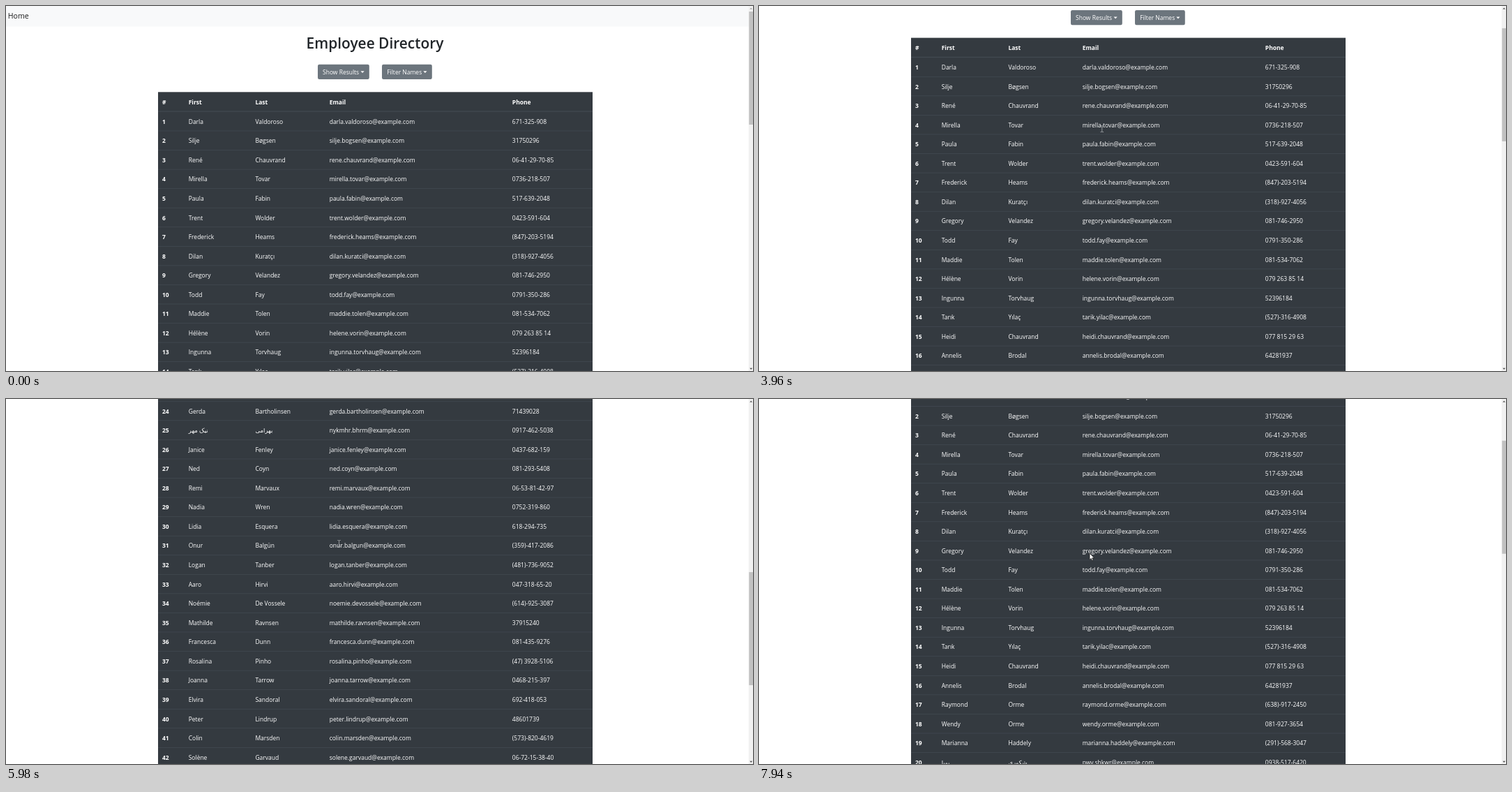
Recreate the animation shown at these times as an HTML page. Size 1071 by 523 pixels, loop 8000 ms.

```html
<!DOCTYPE html>
<html lang="en">
<head>
<meta charset="utf-8">
<title>Employee Directory</title>
<style>
html, body { margin: 0; width: 100%; height: 100%; overflow: hidden; background: #fff; }
svg { display: block; width: 1071px; height: 523px; font: 8.5px "Open Sans", "Noto Sans", "DejaVu Sans", sans-serif; }
.bold { font-weight: 700; }
.light { fill: #fff; }
</style>
</head>
<body>
<svg id="stage" viewBox="0 0 1071 523">
  <g id="page">
    <rect width="1065" height="29.5" fill="#f8f9fa"/>
    <text x="2.8" y="18.4" font-size="10.6" fill="#1a1a1a">Home</text>
    <text x="529" y="61" font-size="20.9" font-weight="600" text-anchor="middle" fill="#212529">Employee Directory</text>
    <g fill="#6c757d">
      <rect x="447" y="83.8" width="73.8" height="21.2" rx="2.2"/>
      <rect x="539" y="83.8" width="71.8" height="21.2" rx="2.2"/>
    </g>
    <g class="light">
      <text x="454" y="97.8">Show Results</text>
      <path d="M508.5 93.2h5.2l-2.6 2.7z"/>
      <text x="546.2" y="97.8">Filter Names</text>
      <path d="M598.3 93.2h5.2l-2.6 2.7z"/>
    </g>
    <g id="table"></g>
  </g>
  <rect x="1064.7" width="6.3" height="523" fill="#f1f1f1"/>
  <rect id="thumb" x="1065.3" width="5.7" height="162" fill="#c1c1c1"/>
  <path id="up" d="M1066.2 4.6h4l-2-2.2z"/>
  <path d="M1066.2 518.8h4l-2 2.2z" fill="#505050"/>
  <g id="cursor">
    <path id="arrow" d="M0 0V9.4l2.2-2 1.5 3.4 1.5-.7-1.5-3.3h2.9z" fill="#fff" stroke="#111" stroke-width=".7"/>
    <path id="beam" d="M-2.2-4.5h1.6l.6.5.6-.5h1.6M0-4V4M-2.2 4.5h1.6l.6-.5.6.5h1.6" fill="none" stroke="#b4b7ba" stroke-width=".75"/>
  </g>
</svg>
<script>
const LOOP = 8000, ROW = 27.56, TABLE_TOP = 123.3, BODY_TOP = 151.4;
const COLUMNS = [224, 261.7, 357.4, 463.7, 725.8];

// First | last | phone | mailbox, where it is not first.last
const people = `Darla|Valdoroso|671-325-908
Silje|Bøgsen|31750296
René|Chauvrand|06-41-29-70-85
Mirella|Tovar|0736-218-507
Paula|Fabin|517-639-2048
Trent|Wolder|0423-591-604
Frederick|Heams|(847)-203-5194
Dilan|Kuratçı|(318)-927-4056
Gregory|Velandez|081-746-2950
Todd|Fay|0791-350-286
Maddie|Tolen|081-534-7062
Hélène|Vorin|079 263 85 14
Ingunna|Torvhaug|52396184
Tarık|Yılaç|(527)-316-4908
Heidi|Chauvrand|077 815 29 63
Annelis|Brodal|64281937
Raymond|Orme|(638)-917-2450
Wendy|Orme|081-927-3654
Marianna|Haddely|(291)-568-3047
پویا|شکوری|0938-517-6420|pwy.shkwr
Jarod|Penner|(746)-351-8207
Helena|Torvi|041-286-57-93
Bethany|Colwin|(385)-719-0264
Gerda|Bartholinsen|71439028
نیک مهر|بهرامی|0917-462-5038|nykmhr.bhrm
Janice|Fenley|0437-682-159
Ned|Coyn|081-293-5408
Remi|Marvaux|06-53-81-42-97
Nadia|Wren|0752-319-860
Lidia|Esquera|618-294-735
Onur|Balgün|(359)-417-2086
Logan|Tanber|(481)-736-9052
Aaro|Hirvi|047-318-65-20
Noémie|De Vossele|(614)-925-3087
Mathilde|Ravnsen|37915240
Francesca|Dunn|081-435-9276
Rosalina|Pinho|(47) 3928-5106
Joanna|Tarrow|0468-215-397
Elvira|Sandoral|692-418-053
Peter|Lindrup|48601739
Colin|Marsden|(573)-820-4619
Solène|Garvaud|06-72-15-38-40
Hannes|Brückler|0251-7360948
Judith|Farlow|081-618-4327
Tomas|Ekeland|83527014`.split("\n").map(line => line.split("|"));

const $ = id => document.getElementById(id);

function add(tag, attributes, text = "") {
  const node = document.createElementNS("http://www.w3.org/2000/svg", tag);
  for (const key in attributes) node.setAttribute(key, attributes[key]);
  node.textContent = text;
  $("table").append(node);
}

const addLine = (y, height) => add("rect", { x: 218, y, width: 623, height, fill: "#454d55" });

const addRow = (cells, y, isBold) => cells.forEach((cell, i) =>
  add("text", { x: COLUMNS[i], y, class: isBold(i) ? "light bold" : "light" }, cell));

const toMailbox = name => name.toLowerCase().replace(/ø/g, "o").replace(/ı/g, "i")
  .normalize("NFD").replace(/[\u0300-\u036f\s]/g, "");

add("rect", { x: 218, y: TABLE_TOP, width: 623, height: BODY_TOP - TABLE_TOP + people.length * ROW, fill: "#343a40" });
addRow(["#", "First", "Last", "Email", "Phone"], 140.7, () => true);
addLine(BODY_TOP - .9, 1);
people.forEach(([first, last, phone, mailbox = toMailbox(first) + "." + toMailbox(last)], i) => {
  const top = BODY_TOP + i * ROW;
  if (i) addLine(top - .3, .6);
  addRow([i + 1, first, last, mailbox + "@example.com", phone], top + 17.3, column => column === 0);
});

// Keyframes: time, then values
const scrollPath = [[0, 0], [3780, 0], [4440, 283.3], [4670, 333], [4820, 338], [4940, 338], [5200, 563.4],
  [5430, 844], [5800, 844], [6130, 731], [6510, 731], [6690, 637.6], [6860, 619], [7060, 619], [7940, 168.5], [8000, 168.5]];
const cursorPath = [[0, 1080, 530], [320, 1080, 530], [410, 1053, 516], [490, 1080, 530], [1130, 1080, 530],
  [1950, 516, 88], [2030, 515, 87], [2180, 489, 68], [2640, 2, 25], [2790, 2, 24], [2890, 34, 22], [3010, 34, 22],
  [3560, 493, 170.5], [3650, 493, 170.5], [4440, 490, 184.5], [5200, 486.5, 194.5], [5430, 477.5, 207],
  [6290, 477.5, 207], [6370, 474, 221], [8000, 474, 221]];

function sample(path, time) {
  const i = Math.max(1, path.findIndex(key => key[0] > time));
  const [from, to] = [path[i - 1], path[i]];
  const part = (time - from[0]) / (to[0] - from[0]);
  return from.slice(1).map((value, k) => value + (to[k + 1] - value) * part);
}

function draw(now) {
  const time = now % LOOP;
  const [scroll] = sample(scrollPath, time);
  const [x, y] = sample(cursorPath, time);
  const isBeam = time >= 3520 && time < 6300;
  $("page").setAttribute("transform", `translate(0 ${-scroll})`);
  $("thumb").setAttribute("y", 8 + scroll * .307);
  $("up").setAttribute("fill", scroll ? "#505050" : "#a3a3a3");
  $("cursor").setAttribute("transform", `translate(${x} ${y})`);
  $("arrow").style.display = isBeam ? "none" : "";
  $("beam").style.display = isBeam ? "" : "none";
}

const start = performance.now();
function tick() {
  draw(performance.now() - start);
  requestAnimationFrame(tick);
}
tick();
</script>
</body>
</html>
```
